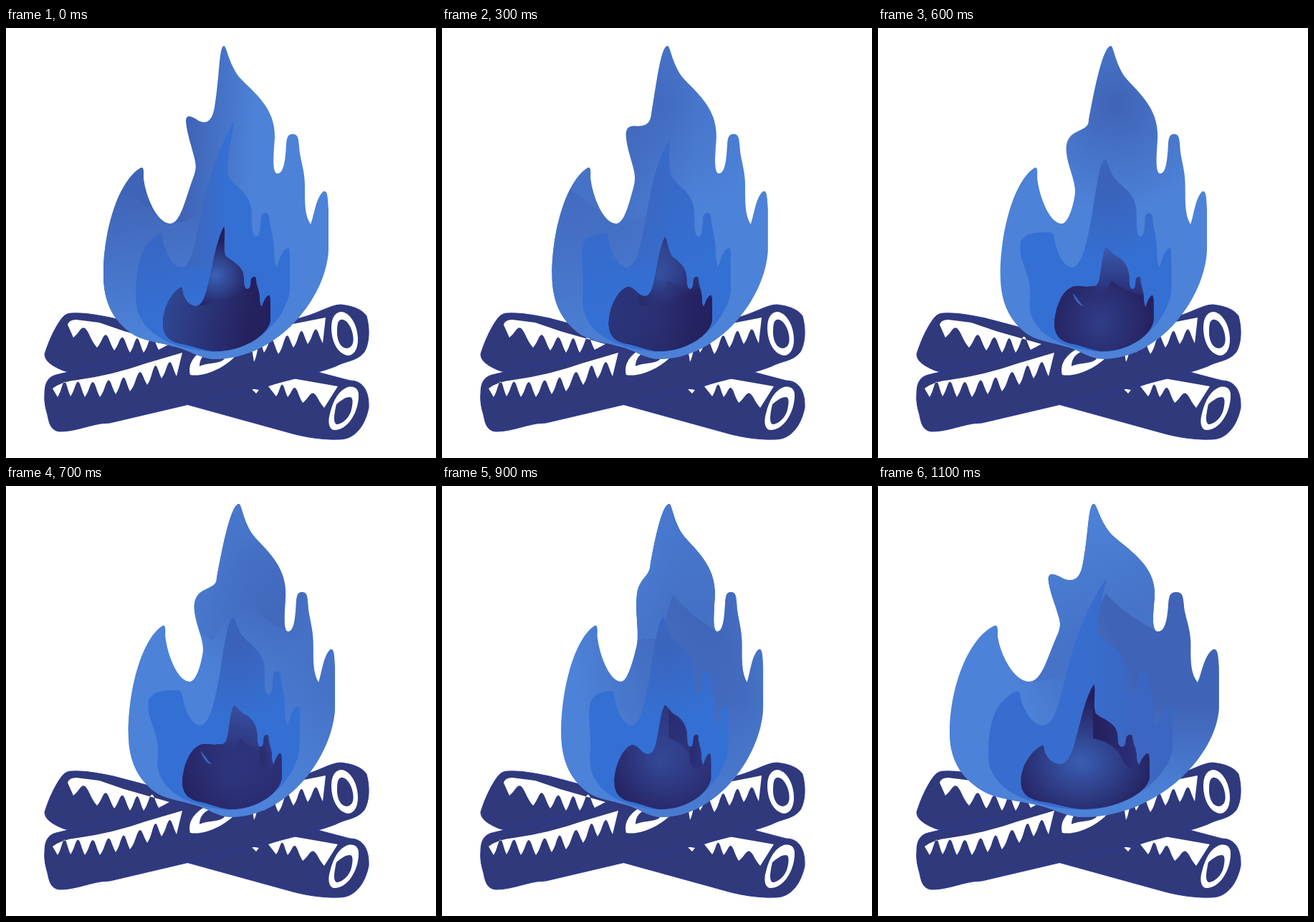
Recreate the animation shown at these times as an HTML page with a canvas. Size 600x600 px, loop 1.2 s.

```html
<!DOCTYPE html>
<html lang="en">
<head>
<meta charset="utf-8">
<title>Blue campfire</title>
<style>
html, body { margin: 0; width: 100%; height: 100%; overflow: hidden; background: #fff; }
canvas { display: block; width: 600px; height: 600px; }
</style>
</head>
<body>
<canvas id="stage" width="600" height="600"></canvas>
<script>
const ctx = document.getElementById('stage').getContext('2d');
const STEP = 100, COUNT = 12;

// Flame outlines: each variant shares one command structure, so variants can be blended.
const outerRight = 'M304 25C308 25 310 48 325 68C344 89 376 110 375 152C374 172 370 203 379 203' +
  'C388 203 390 182 391 162C392 153 393 148 400 148C408 148 408 155 409 165C410 185 418 198 417 228' +
  'C417 245 417 262 425 274C430 262 432 237 443 228C449 226 449 238 450 252L450 310' +
  'C447 375 380 462 291 462C270 461 255 449 237 445C215 439 195 437 180 429' +
  'C152 412 136 385 136 345C136 280 158 212 188 195' +
  'C193 193 192 201 192 210C195 235 211 273 229 273';
const midRight = 'C343 275 343 291 349 291C356 291 355 272 356 264C357 257 366 256 367 263' +
  'C368 280 374 290 374 312C374 322 375 328 378 334C382 322 385 310 393 307' +
  'C396 305 396 318 396 330L396 365C394 400 350 452 291 452';
const midLeft = 'C250 450 181 435 181 375C181 335 188 310 200 298C205 292 210 288 213 287' +
  'C217 284 218 290 219 297C223 315 233 334 245 334';
const coreRight = 'C332 358 333 364 337 364C342 364 341 354 342 350C344 346 349 346 349 350' +
  'C349 360 354 365 354 378C354 383 355 387 357 389C360 380 363 374 367 373' +
  'C369 374 369 382 369 390L369 408C365 430 330 451 291 451C275 450 262 444 247 441';
const coreLeft = 'C228 438 219 430 219 412C219 390 232 368 244 362C246 361 246 366 247 371' +
  'C250 380 256 388 265 388';

const shapes = {
  horn: [
    outerRight + 'C243 273 250 240 259 215C266 197 266 193 262 178C258 162 252 145 251 130' +
      'C251 118 262 125 268 129C276 133 287 135 291 110C298 70 297 25 304 25Z',
    'M318 130C320 134 305 185 309 205C318 222 343 230 343 260' + midRight + midLeft +
      'C258 334 264 300 270 272C278 232 288 185 318 130Z',
    'M304 277C307 280 303 305 306 317C314 326 332 330 332 350' + coreRight + coreLeft +
      'C278 388 282 355 288 330C293 305 299 285 304 277Z'
  ],
  bump: [
    outerRight + 'C240 273 247 245 249 234C251 224 247 212 243 200C239 188 236 178 236 167' +
      'C237 153 245 148 252 145C262 140 270 138 270 130C277 95 291 25 304 25Z',
    'M295 183C299 183 300 200 312 212C325 225 343 232 343 260' + midRight +
      'C250 450 181 435 180 385C188 345 160 325 167 298C176 284 195 285 213 285' +
      'C219 288 218 298 221 305C226 322 236 334 245 334' +
      'C262 334 270 285 275 262C281 225 288 183 295 183Z',
    'M297 306C301 308 306 316 316 320C326 326 332 336 332 350' + coreRight +
      'C228 438 218 430 218 412C220 388 230 366 246 361C252 359 262 361 267 361' +
      'C272 360 275 361 279 360C287 358 287 345 289 335C291 322 294 306 297 306Z'
  ],
  slim: [
    outerRight + 'C240 273 251 232 257 215C260 205 263 192 265 180C267 165 269 150 271 139' +
      'C272 130 274 122 275 115C276 108 278 100 279 92C284 65 294 25 304 25Z',
    'M294 183C298 183 298 205 309 214C320 225 343 235 343 260' + midRight + midLeft +
      'C262 334 268 290 274 262C280 225 288 183 294 183Z',
    'M299 306C303 308 306 316 314 320C325 326 332 336 332 350' + coreRight + coreLeft +
      'C278 388 282 362 287 340C291 322 295 306 299 306Z'
  ]
};

const LIGHT = '#4c82d8', LIGHT0 = 'rgba(76,130,216,0)', DARK = '#3f63b6', DARK0 = 'rgba(63,99,182,0)';
const MID = '#3470d4', DUSK = '#3b61b7', NAVY = '#25205e';
const line = (x0, y0, x1, y1, a, b, area) => ({ g: [x0, y0, x1, y1], a, b, area });
const glow = (x, y, r, a, b, area) => ({ g: [x, y, 0, x, y, r], a, b, area });
const fade = line(0, 300, 0, 440, LIGHT0, LIGHT);
const litCore = [glow(289, 385, 86, '#395eb3', NAVY),
  line(306, 0, 352, 0, NAVY, '#2b2f78',
    'M303 300L306 317Q335 328 332 360L350 347L356 389Q345 402 336 378Q328 358 303 352Z')];
const duskMid = [glow(300, 215, 115, DUSK, MID)];

// Shading per look: fills for the outer, middle and core flame.
const looks = {
  left: [
    [line(250, 160, 345, 165, DARK, LIGHT), fade,
      line(190, 215, 230, 420, DARK, LIGHT, 'M100 180L229 273Q255 270 272 262Q300 330 300 470H100Z')],
    [line(200, 290, 235, 400, '#3866c4', MID),
      line(270, 0, 310, 0, '#3c68c2', MID, 'M245 334Q290 330 310 320L400 380V120H240Z')],
    [glow(293, 345, 48, '#3a62b6', NAVY),
      line(220, 400, 340, 420, '#304792', NAVY, 'M200 350H255L265 388Q310 382 345 363L380 360V460H200Z')]
  ],
  top: [
    [glow(312, 105, 150, DARK, LIGHT)],
    duskMid,
    [line(0, 306, 0, 368, '#3a5aac', '#2b3078'),
      glow(288, 410, 84, '#303d88', NAVY, 'M200 340L279 360Q285 392 305 352Q330 370 350 372L400 360V460H200Z')]
  ],
  right: [
    [line(270, 300, 390, 220, LIGHT, DARK), fade,
      line(300, 80, 370, 180, LIGHT, DARK, 'M230 0H380V203Q340 190 310 155L265 215L230 200Z')],
    duskMid,
    [line(245, 440, 335, 320, NAVY, '#37489a'),
      line(336, 0, 356, 0, NAVY, '#30418e', 'M336 340H350L356 389Q345 405 336 385Z')]
  ],
  middle: [
    [line(165, 300, 265, 280, LIGHT, DARK), line(330, 240, 440, 220, DARK0, LIGHT), fade,
      line(270, 120, 305, 125, LIGHT, '#497bd1', 'M255 215Q272 210 288 216L310 150Q340 185 380 203V0H240Z')],
    [glow(300, 225, 95, '#3b66bf', MID)],
    litCore
  ],
  side: [
    [line(220, 300, 350, 250, LIGHT, DARK), fade,
      line(290, 40, 360, 170, LIGHT, '#4673c8',
        'M230 0H380V203Q345 185 318 150L272 262Q255 272 229 273L230 200Z')],
    [line(300, 0, 345, 0, '#376dce', '#3b67c3')],
    litCore
  ]
};

// Poses: left edge, horizontal stretch, outline, shading; odd steps blend their neighbours.
const poses = [
  [136, 1, 'horn', 'left'],
  [159.8, .918, 'bump', 'top'],
  [147.3, 1, 'horn', 'left'],
  [170.8, .918, 'bump', 'top'],
  [170.8, .918, 'bump', 'right'],
  [162, .876, 'slim', 'middle'],
  [100, 1.197, 'horn', 'side']
];
const order = [[0], [0, 1], [1], [1, 2], [2], [2, 3], [3], [3, 4], [4], [4, 5], [5], [6]];

function blend(a, b) {
  if (a === b) return a;
  const other = b.match(/\d+/g);
  let i = 0;
  return a.replace(/\d+/g, n => (+n + +other[i++]) / 2);
}

function paint(fill) {
  const g = fill.g.length === 4 ? ctx.createLinearGradient(...fill.g) : ctx.createRadialGradient(...fill.g);
  g.addColorStop(0, fill.a);
  g.addColorStop(1, fill.b);
  ctx.fillStyle = g;
  if (fill.area) ctx.fill(new Path2D(fill.area));
  else ctx.fillRect(100, 0, 400, 500);
}

function drawFlame(step) {
  const [ia, ib = ia] = order[step];
  const a = poses[ia], b = poses[ib];
  const left = (a[0] + b[0]) / 2, k = (a[1] + b[1]) / 2;
  ctx.save();
  ctx.transform(k, 0, 0, 1, left - 136 * k, 0);
  for (let layer = 0; layer < 3; layer++) {
    ctx.save();
    ctx.clip(new Path2D(blend(shapes[a[2]][layer], shapes[b[2]][layer])));
    looks[a[3]][layer].forEach(paint);
    if (a[3] !== b[3]) {
      ctx.globalAlpha = .5;
      looks[b[3]][layer].forEach(paint);
    }
    ctx.restore();
  }
  if (a[2] === 'bump' && b[2] === 'bump') {
    shape('M246 370C250 382 257 388 263 388C257 385 252 375 246 370Z', '#3a68c4');
  }
  ctx.restore();
}

const WOOD = '#2f397c';
function shape(d, color) {
  ctx.fillStyle = color;
  ctx.fill(new Path2D(d));
}
function log(d) {
  shape(d, WOOD);
  ctx.strokeStyle = '#2d389a';
  ctx.lineWidth = 1;
  ctx.stroke(new Path2D(d));
}
// White bark: an upper edge, then pointed drips joined by dark arches from right to left.
function bark(edge, rise, tips) {
  let d = edge;
  tips.forEach(([x, y], i) => {
    if (!i) { d += `L${x} ${y}`; return; }
    const [px, py] = tips[i - 1], w = (px - x) * .3;
    d += `C${px - w} ${py - rise * .6} ${px - w} ${py - rise} ${(px + x) / 2} ${(py + y) / 2 - rise}`;
    d += `C${x + w} ${y - rise * .8} ${x + w} ${y - rise * .4} ${x} ${y}`;
  });
  shape(d + 'Z', '#fff');
}

function drawLogs() {
  log('M92 398C110 397 130 401 150 405L480 492C500 492 507 510 506 530C502 550 490 574 465 574' +
    'C440 575 415 570 400 566L255 526L80 478C65 472 54 465 54 455C60 435 70 415 78 405C82 400 86 398 92 398Z');
  bark('M86 414Q88 407 98 407L130 411L165 423L228 441', 20,
    [[213, 449], [192, 453], [173, 453], [151, 450], [127, 446], [94, 432]]);
  bark('M366 500L400 489L463 500', 17, [[444, 530], [414, 523], [393, 515], [377, 514]]);
  shape('M342 503L353 505L349 510Z', '#fff');
  shape('M477 501C487 499 493 504 492 515C491 537 477 561 458 561C450 560 449 548 452 538C457 518 465 505 477 501Z', '#fff');
  shape('M480 515C485 515 484 526 481 536C477 546 468 553 461 553C456 550 458 538 461 525C467 520 473 515 480 515Z', WOOD);

  log('M54 510C54 496 58 487 70 484C100 476 130 472 160 464L260 440L400 407C430 402 452 386 467 386' +
    'C485 388 497 393 503 402C508 420 507 440 500 452C490 465 475 464 460 472C440 480 400 490 380 495' +
    'L260 524L145 551L132 552C110 556 95 563 75 563C62 562 60 550 58 540C55 530 53 520 54 510Z');
  bark('M65 503Q78 493 100 491Q150 484 195 468L246 453', 21,
    [[238, 486], [217, 489], [197, 498], [173, 507], [153, 511], [131, 515], [110, 515], [90, 514], [72, 515]]);
  shape('M257 484C253 470 262 453 285 445L325 452C312 470 280 488 257 484Z', '#fff');
  shape('M270 472C270 460 278 452 290 450L306 460C300 470 282 466 270 472Z', WOOD);
  bark('M340 428L395 414L446 404', 20,
    [[442, 440], [421, 441], [401, 446], [380, 455], [360, 453], [346, 466]]);
  shape('M467 396C480 396 491 415 491 435C491 450 484 457 477 457C463 455 454 438 454 418C454 405 459 397 467 396Z', '#fff');
  shape('M467 407C474 405 482 416 484 428C486 440 483 446 475 447C467 446 463 438 462 427C462 417 462 409 467 407Z', WOOD);
}

function draw(now) {
  const step = Math.floor(now / STEP) % COUNT;
  ctx.fillStyle = '#fff';
  ctx.fillRect(0, 0, 600, 600);
  drawLogs();
  drawFlame(step);
}

const start = performance.now();
function tick() {
  draw(performance.now() - start);
  requestAnimationFrame(tick);
}
tick();
</script>
</body>
</html>
```
